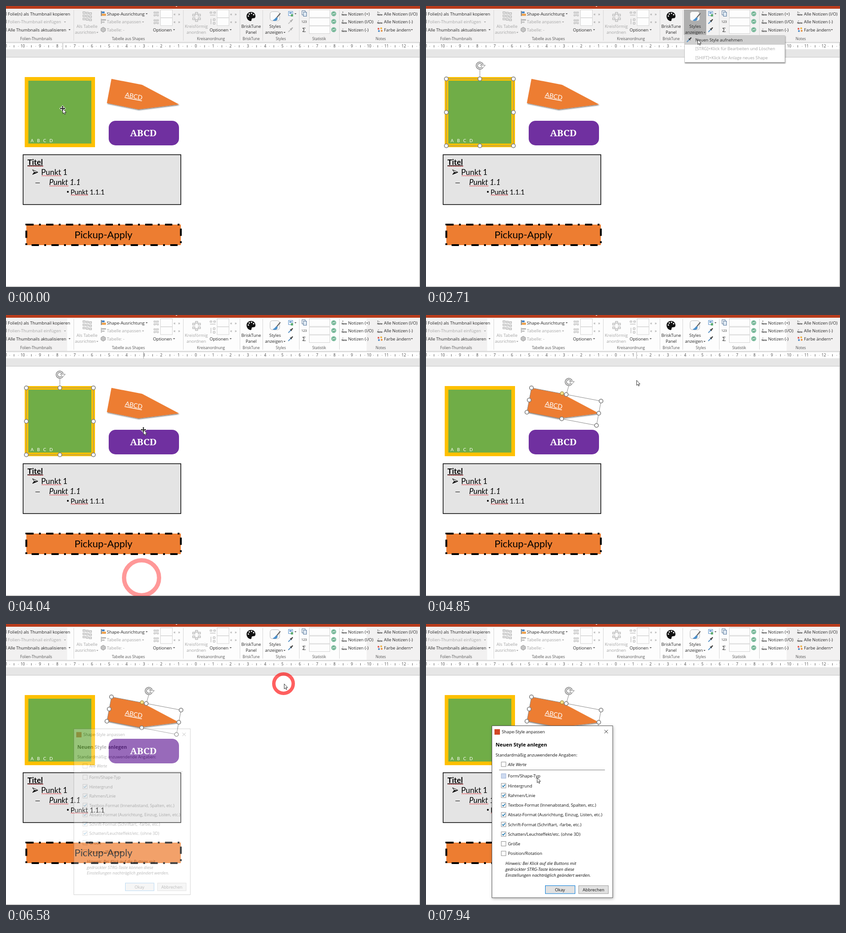
These frames come from a looping animation (907 by 617 pixels, 8 s). An HTML page:

```html
<!DOCTYPE html>
<html lang="de">
<head>
<meta charset="utf-8">
<title>Shape-Styles</title>
<style>
  html, body { margin: 0; width: 100%; height: 100%; overflow: hidden; background: #fff; }
  svg { display: block; width: 100vw; height: 100vh; font-family: 'Open Sans', sans-serif; }
  .slide { font-family: Lato, sans-serif; }
  .slab { font-family: 'Noto Serif', serif; }
  .mid { text-anchor: middle; }
  .bold { font-weight: 700; }
  .ital { font-style: italic; }
</style>
</head>
<body>
<svg id="stage" viewBox="0 0 907 617"></svg>
<script>
const LOOP = 8000, INK = '#262626', OFF = '#a5a5a5', ORANGE = '#ed7d31';

// ---- drawing helpers
const rect = (x, y, w, h, fill, more = '') =>
  `<rect x="${x}" y="${y}" width="${w}" height="${h}" fill="${fill}" ${more}/>`;
const box = (x, y, w, h, fill, stroke) => rect(x + .5, y + .5, w - 1, h - 1, fill, `stroke="${stroke}"`);
const dot = (x, y, r, fill, more = '') => `<circle cx="${x}" cy="${y}" r="${r}" fill="${fill}" ${more}/>`;
const line = (d, stroke, width = 1, more = '') =>
  `<path d="${d}" fill="none" stroke="${stroke}" stroke-width="${width}" ${more}/>`;
const area = (d, fill, more = '') => `<path d="${d}" fill="${fill}" ${more}/>`;
const text = (x, y, s, size = 9.4, fill = INK, cls = '', more = '') =>
  `<text x="${x}" y="${y}" font-size="${size}" fill="${fill}" class="${cls}" ${more}>${s}</text>`;
const group = (content, attrs) => `<g ${attrs}>${content}</g>`;
const drop = (x, y, fill = '#555') => area(`M${x - 2} ${y - 1}h4.4l-2.2 2.6z`, fill);
const times = (n, fn) => Array.from({ length: n }, (_, i) => fn(i)).join('');

// ---- ribbon
const caption = (x, s) => text(x, 75.2, s, 8.2, '#555', 'mid');

function twoLines(x, first, second, fill = INK, indent = 0) {
  return text(x, 48.3, first, 9.4, fill, 'mid') + text(x - indent, 61, second, 9.4, fill, 'mid');
}

function dropper(x, y, on) {
  return line(`M${x - 4.5} ${y + 5}l6-6`, on ? '#5b93c4' : '#c4c4c4', 2) +
    line(`M${x - .5} ${y - 2.5}l3.5 3.5`, on ? '#333' : '#aaa', 1.4) +
    line(`M${x + 1.5} ${y - 1}l3-3`, on ? '#333' : '#aaa', 2.4, 'stroke-linecap="round"');
}

function spacingIcon(x, y) {
  return line(`M${x - 5} ${y - 4}h3v3h-3zM${x + 2} ${y - 4}h3v3h-3zM${x - 5} ${y + 2}h3v3h-3zM${x + 2} ${y + 2}h3v3h-3zM${x} ${y - 5}v10`, '#b0b0b0');
}

function spinner(x, y) {
  return box(x, y, 27, 18, '#fdfdfd', '#d4d4d4') + text(x + 29, y + 12.5, '«', 9, '#888') + text(x + 39, y + 12.5, '»', 9, '#888');
}

function refresh(y) {
  return dot(718, y, 4.6, '#dcefe5', 'stroke="#4ba37a" stroke-width="1.4"') +
    line(`M716 ${y}a2 2 0 0 1 4-1M720 ${y}a2 2 0 0 1-4 1`, '#2f8a5e', 1.3);
}

function noteIcon(x, y, mark) {
  return text(x, y + 5, 'Note', 4.6, INK, 'mid bold') + text(x - 3, y - .5, mark, 5, INK, 'mid bold');
}

function palette() {
  return area('M537 13c-6 0-10 4.5-10 9.5s4 10.5 9 10.5c3 0 1-4 3-5.5s7 1 7.5-4.5c.4-6-4-10-9.5-10z', '#111') +
    [[531, 22], [533, 17.5], [538, 16], [542.5, 19]].map(p => dot(...p, 1.5, '#fff')).join('');
}

const RIBBON_BACK = rect(0, 0, 907, 80, '#f2f1f1') + rect(0, 0, 907, 6, '#b83c1c') + rect(372, 0, 3, 1.5, '#f0cfc4');

const RIBBON = rect(0, 79, 907, 1, '#d2d2d2') +
  [148, 388, 512, 562, 642, 730].map(x => rect(x, 9, 1, 67, '#d6d6d6')).join('') +
  // thumbnails
  text(4, 20.5, 'Folie(n) als Thumbnail kopieren') + text(4, 38, 'Folien-Thumbnail einfügen', 9.4, OFF) + drop(129, 35, OFF) +
  text(4, 55.5, 'Alle Thumbnails aktualisieren') + drop(139, 52) +
  [13, 30, 48].map(y => rect(0, y, 1.5, 8, '#999')).join('') + caption(66, 'Folien-Thumbnails') +
  // table from shapes
  times(9, i => box(168 + i % 3 * 7, 12 + (i / 3 | 0) * 7 + i % 3, 6, 5, '#e4e4e4', '#b2b2b2')) +
  twoLines(177.5, 'Als Tabelle', 'ausrichten', OFF, 3.5) + drop(200, 58, OFF) +
  rect(208, 11, 1.5, 11, '#666') + rect(210, 12, 6, 4, '#4a86c5') + rect(210, 17, 9, 4.5, '#eda04b') +
  text(221, 20.5, 'Shape-Ausrichtung') + drop(308, 17) +
  rect(208, 28, 1.5, 11, '#aaa') + rect(210, 29, 9, 3, '#b5b5b5') + rect(210, 34, 6, 3, '#c5c5c5') +
  text(221, 38, 'Tabelle anpassen', 9.4, OFF) + drop(300, 35, OFF) +
  area('M213 46.5l5 3v5l-5 3-5-3v-5z', '#c4c4c4', 'stroke="#999"') + text(221, 55.5, 'Tabelle: -', 9.4, OFF) +
  spacingIcon(329, 17) + spacingIcon(329, 34) + spinner(338, 8) + spinner(338, 25.5) +
  text(322, 55.5, 'Optionen') + drop(368, 52) + caption(268, 'Tabelle aus Shapes') +
  // circular layout
  times(6, i => box(414.5 + 7 * Math.sin(i * Math.PI / 3), 21.5 - 8 * Math.cos(i * Math.PI / 3), 6, 5, '#eee', '#a8a8a8')) +
  twoLines(417, 'Kreisförmig', 'anordnen', OFF) +
  line('M447 13h4v3h-4zM455 13h4v3h-4zM447 20h12M449 28v12M454 28h4v4h-4zM454 36h4v4h-4z', '#aaa') +
  spinner(462, 8) + spinner(462, 25.5) + text(446, 55.5, 'Optionen') + drop(492, 52) + caption(449, 'Kreisanordnung') +
  // panel
  palette() + twoLines(537, 'BriskTune', 'Panel') + caption(537, 'BriskTune') +
  // styles
  rect(619, 12, 9, 9, '#fff', 'stroke="#4a86c5"') + rect(621, 14, 5, 2.5, '#4a86c5') + rect(624, 18, 5, 5, '#5fae72') +
  drop(634, 17) + caption(602, 'Styles') +
  // statistics
  box(648, 10, 8, 10, '#fff', '#58789c') + box(651, 13, 8, 10, '#dfe9f3', '#58789c') +
  text(653, 36.5, '123', 7, INK, 'mid') + text(653, 56.5, 'Σ', 13, INK, 'mid') +
  [8, 26, 43.5].map(y => box(664, y, 46, 17.5, '#fdfdfd', '#d4d4d4')).join('') + [17, 34, 52].map(refresh).join('') +
  caption(686, 'Statistik') +
  // notes
  noteIcon(741, 16, '+') + noteIcon(741, 34, '±') + noteIcon(741, 52, '–') +
  text(749.5, 20.5, 'Notizen (+)') + text(749.5, 38, 'Notizen (I/O)') + text(749.5, 55.5, 'Notizen (-)') +
  noteIcon(819, 16, '+–') + noteIcon(819, 34, '–') +
  text(828, 20.5, 'Alle Notizen (I/O)') + text(828, 38, 'Alle Notizen (-)') + text(828, 55.5, 'Farbe ändern') + drop(889, 52) +
  dot(816, 50, 2, '#e2574c') + dot(822, 49, 2, '#f0b23c') + dot(817, 55, 2, '#4a86c5') + dot(823, 54.5, 2, '#e58a35') +
  caption(821, 'Notes');

const RULER = rect(0, 80, 907, 33, '#e6e6e6') + rect(0, 82, 907, 13, '#fff') + rect(0, 112, 907, 1, '#c4c4c4') +
  times(25, i => {
    const x = 416 + (i - 11) * 37.95;
    return text(x, 91.3, Math.abs(i - 11), 8.4, '#444', 'mid') + rect(x + 18.5, 86, 1, 5, '#666') +
      [9, 28].map(d => rect(x + d, 88, 1, 1, '#777')).join('');
  });

function stylesButton(state) {
  return rect(565, 8, 49, 55.5, ['none', '#c6c6c6', '#aeaeae'][state]) +
    rect(578.5, 12.5, 21, 20, '#fafafa', 'rx="5" stroke="#b9b9b9"') +
    line('M601 16l-9 11', '#666', 2.2) + area('M593 25c-3 0-4 5-9 6 4 3 11 2 11-4z', '#4a8fcb') +
    twoLines(589.5, 'Styles', 'anzeigen', INK, 2.5) + drop(610, 58);
}

// ---- slide
function squiggle(from, to, y) {
  const n = Math.round((to - from) / 2);
  return line(`M${from} ${y}` + times(n, i => `l2 ${i % 2 ? 1.6 : -1.6}`), '#e0343c', .9);
}

const SLIDE = rect(0, 113, 907, 504, '#fff') +
  rect(45, 160, 146, 146, '#70ad47', 'stroke="#ffc000" stroke-width="8"') +
  text(54, 298.5, 'ABCD', 9.6, '#fff', '', 'letter-spacing="7.4"') +
  area('M231 160L298 173L379 216L290 227L221 213Z', ORANGE, 'filter="url(#shade)"') +
  text(280, 203, 'ABCD', 14, '#fff', 'mid', 'text-decoration="underline" transform="rotate(10.8 280 198)"') +
  rect(225, 252, 154, 54, '#7030a0', 'rx="15"') + text(301, 286, 'ABCD', 20.5, '#fff', 'mid bold slab') +
  rect(37.5, 326.5, 345.5, 109.5, '#e4e4e4', 'stroke="#000" stroke-width="1.5"') +
  text(47, 349, 'Titel', 16.8, '#000', 'bold', 'text-decoration="underline"') + squiggle(48, 81, 352.5) +
  area('M58 359.5L70 365L58 370L62 365Z', 'none', 'stroke="#000"') + area('M62 365H70L58 370Z', '#000') +
  text(77, 371, 'Punkt 1', 16.9, '#000') + squiggle(78, 121, 373.5) +
  rect(64.5, 388, 9.5, 1, '#000') + text(94.5, 393, 'Punkt 1.1', 16.9, '#000', 'ital') + squiggle(95, 137, 396) +
  dot(135.5, 408, 2, '#000') + text(141.5, 413.5, 'Punkt 1.1.1', 14.8, '#000') + squiggle(142, 180, 416) +
  area('M44.5 480H383V525H44.5Z', ORANGE, 'stroke="#000" stroke-width="4" stroke-dasharray="16 11.7 4 11.7"') +
  text(213.5, 510, 'Pickup-Apply', 21.7, '#000', 'mid');

const handle = ([x, y]) => dot(x, y, 4.2, '#fff', 'stroke="#7d7d7d" stroke-width="1.6"');

// Selection frame given by three corners (top left, top right, bottom left) and its rotation handle.
function selection([ax, ay], [bx, by], [cx, cy], [rx, ry]) {
  const at = (u, v) => [ax + u * (bx - ax) + v * (cx - ax), ay + u * (by - ay) + v * (cy - ay)];
  const spots = [[0, 0], [.5, 0], [1, 0], [1, .5], [1, 1], [.5, 1], [0, 1], [0, .5]].map(p => at(...p));
  const arc = `M${rx + 5} ${ry + 4}A6.5 6.5 0 1 1 ${rx + 6} ${ry - 2}`;
  return line(`M${at(0, 0)}L${at(1, 0)}L${at(1, 1)}L${at(0, 1)}ZM${at(.5, 0)}L${rx},${ry + 8}`, '#8a8a8a') +
    spots.map(handle).join('') +
    area(`M${rx + 1} ${ry - 1}h11l-5.5 6z`, '#fff', 'stroke="#7d7d7d"') + line(arc, '#7d7d7d', 4.5) + line(arc, '#fff', 1.6);
}

const SELECTIONS = ['',
  selection([44.5, 160], [191.5, 160], [44.5, 307], [118, 131]),
  selection([231, 160], [383.5, 189], [221, 213.5], [313, 147]) +
    dot(298, 172, 3.8, '#f7e08a', 'stroke="#8a7a30"')];

// ---- menu: taller once a style is stored
function menu(stored, hot, fading) {
  const shift = stored ? 60 : 0;
  const body = rect(566.5, 64.5, 219.5, 59 + shift, '#fff', `stroke="#c8c8c8" ${fading ? '' : 'filter="url(#shade)"'}`) +
    (hot === 'style' ? rect(567, 65, 59, 59, '#cfcfcf') : '') +
    (hot === 'new' ? rect(567, 64.5 + shift, 219, 20.5, '#cfcfcf') : '') +
    (stored ? rect(572.5, 70.5, 47, 47, '#70ad47', 'stroke="#ffc000" stroke-width="3"') +
      text(575, 115, 'ABCD', 3.5, '#fff', '', 'letter-spacing="2.5"') : '') +
    dropper(576, 74 + shift, true) + text(590, 77.5 + shift, 'Neuen Style aufnehmen', 9.2) +
    text(590, 97 + shift, '[STRG]+Klick für Bearbeiten und Löschen', 9.2, OFF) +
    text(590, 116.5 + shift, '[SHIFT]+Klick für Anlage neues Shape', 9.2, OFF);
  return fading ? group(group(body, 'transform="translate(0 -10)"'), 'opacity=".38" clip-path="url(#below)"') : body;
}

// ---- dialog
const OPTIONS = ['Alle Werte', 'Form/Shape-Typ', 'Hintergrund', 'Rahmen/Linie', 'Textbox-Format (Innenabstand, Spalten, etc.)',
  'Absatz-Format (Ausrichtung, Einzug, Listen, etc.)', 'Schrift-Format (Schriftart, -farbe, etc.)',
  'Schatten/Leuchteffekt/etc. (ohne 3D)', 'Größe', 'Position/Rotation'];
const HINT = ['Hinweis: Bei Klick auf die Buttons mit', 'gedrückter STRG-Taste können diese', 'Einstellungen nachträglich geändert werden.'];

function option(label, i, hovered) {
  const y = i ? 312.5 + i * 21.25 : 308;
  return box(164.5, y - 5.5, 11, 11, hovered ? '#cddaf0' : '#fff', hovered ? '#9fb3d6' : '#8c8c8c') +
    (i > 1 && i < 8 ? line(`M167 ${y}l2.2 2.3 4.3-4.8`, '#0b6ca8', 1.5) : '') +
    text(179.5, y + 3.7, label, 9.3, '#111', i ? '' : 'ital');
}

function dialog({ fading, okay, hoverType }) {
  const body = rect(144.5, 223.5, 264.5, 377.5, '#fff', `stroke="#555" ${fading ? '' : 'filter="url(#lift)"'}`) +
    rect(150, 231, 12, 12, '#d24726') + text(166, 240.3, 'Shape-Style anpassen', 9.3, '#111') +
    line('M391 232.5l7.5 7.5M398.5 232.5l-7.5 7.5', '#222') +
    text(152.5, 268.8, 'Neuen Style anlegen', 11, '#000', 'bold') +
    text(152.5, 290.5, 'Standardmäßig anzuwendende Angaben:', 9.3, '#111') + rect(160, 320, 232, 1, '#777') +
    OPTIONS.map((label, i) => option(label, i, i === 1 && hoverType)).join('') +
    HINT.map((s, i) => text(174, 529 + i * 13.2, s, 9.6, '#111', 'ital')).join('') +
    box(261, 574, 66, 18.5, ['#e1e1e1', '#e5f1fb', '#cce4f7'][okay], '#0078d7') + text(293.5, 586.8, 'Okay', 9.4, '#111', 'mid') +
    box(334, 574, 66, 18.5, '#e1e1e1', '#9d9d9d') + text(367, 586.8, 'Abbrechen', 9.4, '#111', 'mid');
  return fading ? group(body, 'opacity=".28" transform="translate(276 412) scale(.965) translate(-276.5 -412)"') : body;
}

// ---- pointer: time, x, y
const POINTER_PATH = [[0, 124, 225], [530, 129, 221], [650, 133, 217], [1060, 133, 217], [1210, 165, 200], [1570, 556, 79],
  [1720, 578, 68], [1840, 591, 54], [2350, 591, 54], [2710, 595, 73], [2860, 595, 76], [3010, 548, 190], [3130, 442, 352],
  [3250, 395, 480], [3400, 330, 545], [3520, 301, 566], [3670, 297, 577], [3790, 297, 577], [4030, 301, 252],
  [4420, 320, 208], [4730, 320, 208], [4970, 602, 77], [5130, 600, 60], [5370, 597, 35], [5610, 597, 35],
  [5880, 609, 105], [6030, 609, 119], [6300, 609, 131], [6850, 609, 131], [7130, 540, 219], [7280, 422, 325],
  [7670, 325, 333], [7940, 243, 337], [8000, 243, 337]];

function pointerAt(t) {
  const i = POINTER_PATH.findIndex(p => p[0] > t), [t0, x0, y0] = POINTER_PATH[i - 1], [t1, x1, y1] = POINTER_PATH[i];
  const k = (t - t0) / (t1 - t0);
  return [Math.round(x0 + k * (x1 - x0)), Math.round(y0 + k * (y1 - y0))];
}

function pointer([x, y], moving) {
  const star = 'M0-6L2-3.5H.7V-.7H3.5V-2L6 0L3.5 2V.7H.7V3.5H2L0 6L-2 3.5H-.7V.7H-3.5V2L-6 0L-3.5-2V-.7H-.7V-3.5H-2Z';
  return group((moving ? area(star, '#000', 'stroke="#fff" stroke-width="1.6" paint-order="stroke"') : '') +
    area('M.5 .5V11.5L3 9.2L4.7 13L6.4 12.2L4.7 8.6H8Z', '#fff', 'stroke="#222" stroke-width=".9"'),
    `transform="translate(${x} ${y})"`);
}

// Click rings: start, end, centre, first radius
const CLICKS = [[910, 1060, 133, 217, 12], [2080, 2350, 591, 54, 25], [2860, 3010, 595, 76, 25],
  [3790, 4180, 297, 577, 25], [5610, 5760, 597, 36, 20], [6580, 6730, 608, 131, 25]];

function rings(t) {
  return CLICKS.filter(([from, to]) => t >= from && t < to).map(([from, , x, y, r0]) => {
    const r = r0 + (t - from) * .075, width = 5 + r * .1;
    return dot(x, y, r - width / 2, 'none', `stroke="#f00" stroke-width="${width}" opacity="${.94 - r * .0125}"`);
  }).join('');
}

const BURSTS = [[0, 1], [530, 2], [790, 2], [1060, 1], [1210, 4], [1720, 4], [2230, 5], [2860, 1], [3010, 3], [3400, 2], [3670, 4],
  [4180, 3], [4580, 1], [4730, 3], [5130, 5], [5760, 2], [6030, 1], [6180, 2], [6580, 1], [6730, 2], [7130, 1],
  [7280, 1], [7430, 3], [7820, 2]];
const TICKS = BURSTS.flatMap(([start, n]) => Array.from({ length: n }, (_, i) => start + i * 120));

const DEFS = `<defs>
  <filter id="shade" x="-10%" y="-10%" width="120%" height="130%"><feDropShadow dx="1" dy="2" stdDeviation="1.3" flood-opacity=".45"/></filter>
  <filter id="lift" x="-10%" y="-10%" width="120%" height="120%"><feDropShadow dx="1" dy="2" stdDeviation="3" flood-opacity=".28"/></filter>
  <clipPath id="below"><rect x="560" y="64" width="235" height="130"/></clipPath></defs>`;

function scene(t) {
  const during = (a, b) => t >= a && t < b;
  const selected = t >= 4730 ? 2 : t >= 790 ? 1 : 0;
  const menuOpen = during(1960, 2860) || during(5490, 6580);
  const dialogOpen = during(2860, 3910) || t >= 6580;
  const button = menuOpen || during(5370, 5490) ? 2 : during(1720, 1960) || during(5130, 5370) ? 1 : 0;
  const hot = during(2470, 2860) || t >= 6180 ? 'new' : during(5760, 6180) ? 'style' : '';
  const tip = pointerAt(t);
  const overSlide = tip[1] > 113 && !menuOpen && !dialogOpen;
  const brightened = t >= 2860 ? rect(134, 8, 656, 71, '#fdfdfd') : '';
  return DEFS + group(SLIDE, 'class="slide"') + SELECTIONS[selected] +
    (dialogOpen ? dialog({
      fading: during(2860, 3010) || during(6580, 6730),
      okay: during(3670, 3790) ? 1 : during(3790, 3910) ? 2 : 0,
      hoverType: t >= 7940
    }) : '') +
    RULER + (overSlide ? line(`M${tip[0] + .5} 82V95`, '#555', 1, 'stroke-dasharray="1 1"') : '') +
    RIBBON_BACK + brightened + RIBBON + stylesButton(button) + dropper(623, 34, selected) + dropper(623, 52, selected) +
    rect(906, 80, 1, 537, '#9a9a9a') + rect(0, 616, 907, 1, '#9a9a9a') +
    (menuOpen ? menu(t > 5000, hot, during(1960, 2080) || during(5490, 5610)) : '') +
    rings(t) + pointer(tip, t < 1210 || during(4030, 4180));
}

const stage = document.getElementById('stage');
let shown = -1;
function play(now) {
  const t = now % LOOP, tick = TICKS.findLast(k => k <= t) ?? 0;
  if (tick !== shown) stage.innerHTML = scene(shown = tick);
  requestAnimationFrame(play);
}
play(performance.now());
</script>
</body>
</html>
```
